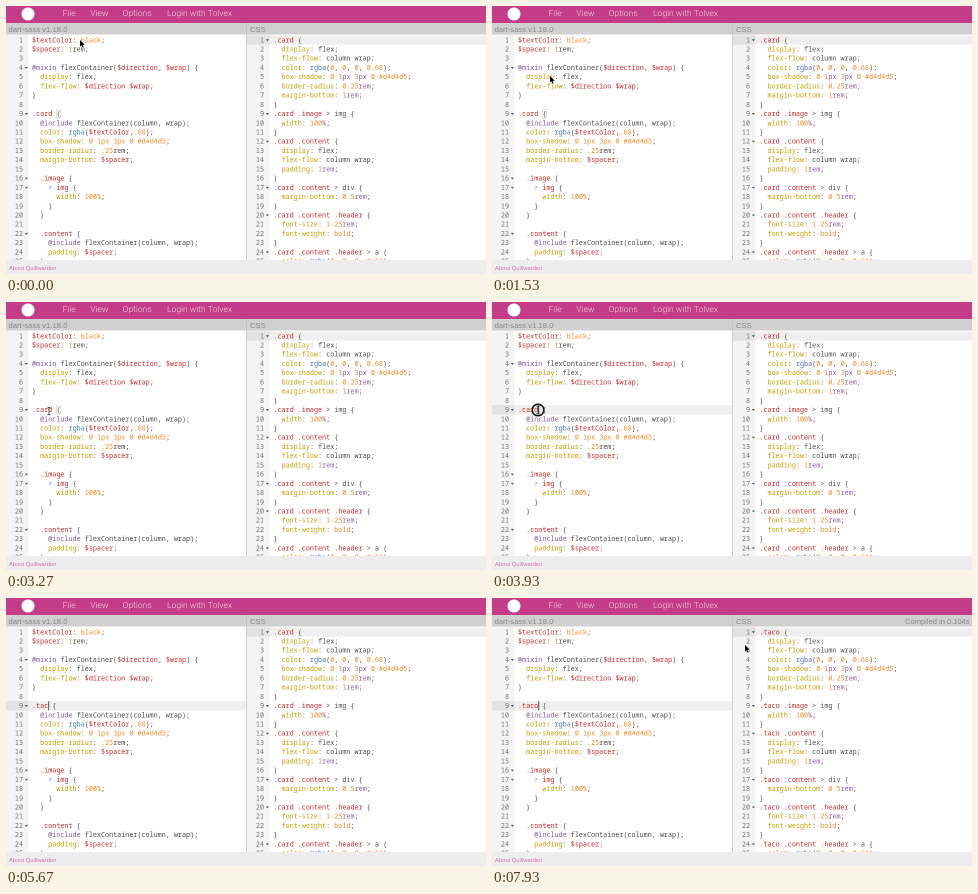
Animation of 480x268 px, one loop 8000 ms. Source, as an HTML page with a canvas:

```html
<!DOCTYPE html>
<html lang="en">
<head>
<meta charset="utf-8">
<title>Sass playground</title>
<style>
html, body { margin: 0; width: 100%; height: 100%; overflow: hidden; background: #fff; }
canvas { display: block; width: 480px; height: 268px; }
</style>
</head>
<body>
<canvas id="stage"></canvas>
<script>
const W = 480, H = 268, LOOP = 8000;
const LINE = 9.22, TOP = 29.4, CH = 4.06, LEFT_X = 26;
const MONO = '6.76px "Noto Sans Mono", "DejaVu Sans Mono", monospace';
const SANS = '"Liberation Sans", Arial, sans-serif';
const LIGHT = 'Roboto, "Liberation Sans", sans-serif';

const color = {
  text: '#4d4d4c', variable: '#c82829', keyword: '#8959a8', number: '#f5871f',
  prop: '#c99e00', func: '#4271ae', op: '#3e999f'
};

// Drawn at double size so that small text keeps its fractional positions
const canvas = document.getElementById('stage');
const scale = 2 * (window.devicePixelRatio || 1);
canvas.width = W * scale;
canvas.height = H * scale;
const ctx = canvas.getContext('2d');

const scss = name => `$textColor: black;
$spacer: 1rem;

@mixin flexContainer($direction, $wrap) {
  display: flex;
  flex-flow: $direction $wrap;
}

.${name} {
  @include flexContainer(column, wrap);
  color: rgba($textColor,.68);
  box-shadow: 0 1px 3px 0 #d4d4d5;
  border-radius: .25rem;
  margin-bottom: $spacer;

  .image {
    > img {
      width: 100%;
    }
  }

  .content {
    @include flexContainer(column, wrap);
    padding: $spacer;
  }`.split('\n');

const css = name => `.card {
  display: flex;
  flex-flow: column wrap;
  color: rgba(0, 0, 0, 0.68);
  box-shadow: 0 1px 3px 0 #d4d4d5;
  border-radius: 0.25rem;
  margin-bottom: 1rem;
}
.card .image > img {
  width: 100%;
}
.card .content {
  display: flex;
  flex-flow: column wrap;
  padding: 1rem;
}
.card .content > div {
  margin-bottom: 0.5rem;
}
.card .content .header {
  font-size: 1.25rem;
  font-weight: bold;
}
.card .content .header > a {
  color: rgba(0, 0, 0, 0.68);`.replaceAll('card', name).split('\n');

const TOKEN = /(\$\w+)|(@\w+)|(#[0-9a-f]{6}|\d*\.?\d+)(px|rem|%)?|([a-z-]+)(?=:)|(rgba)|(black|bold)|(\.[a-z]+)|(img)|(>)/g;

function tokens(line, isCss) {
  const out = [];
  let end = 0;
  const add = (text, fill, at) => { if (text) out.push({ text, fill, at }); };
  for (const m of line.matchAll(TOKEN)) {
    add(line.slice(end, m.index), color.text, end);
    end = m.index + m[0].length;
    const [all, variable, rule, num, unit, prop, func, constant, cls, tag] = m;
    if (num) {
      add(num, color.number, m.index);
      const unitFill = isCss ? color.keyword : unit === 'rem' ? color.text : color.number;
      add(unit, unitFill, m.index + num.length);
      continue;
    }
    const fill = variable || cls ? color.variable
      : rule ? color.keyword
      : prop ? color.prop
      : func ? color.func
      : constant ? color.number
      : isCss ? color.text
      : tag ? color.variable : color.op;
    add(all, fill, m.index);
  }
  add(line.slice(end), color.text, end);
  return out;
}

function rect(x, y, w, h, fill) {
  ctx.fillStyle = fill;
  ctx.fillRect(x, y, w, h);
}

function label(text, x, y, font, fill, align = 'left') {
  ctx.font = font;
  ctx.fillStyle = fill;
  ctx.textAlign = align;
  ctx.fillText(text, x, y);
}

function ring(x, y, r, width, stroke) {
  ctx.beginPath();
  ctx.arc(x, y, r, 0, Math.PI * 2);
  ctx.lineWidth = width;
  ctx.strokeStyle = stroke;
  ctx.stroke();
}

const rowTop = n => TOP + (n - 1) * LINE;
const col = n => LEFT_X + n * CH;

function gutter(x, lines, active) {
  rect(x, 28, 22.5, 226, '#f4f4f4');
  if (active) rect(x, rowTop(active), 22.5, LINE, '#e2e2e2');
  ctx.font = MONO;
  ctx.textAlign = 'right';
  lines.forEach((line, i) => {
    const y = rowTop(i + 1);
    ctx.fillStyle = '#6f6f6e';
    ctx.fillText(i + 1, x + 17, y + 6.9);
    if (!line.endsWith('{')) return;
    ctx.fillStyle = '#555';
    ctx.beginPath();
    ctx.moveTo(x + 18.8, y + 3.9);
    ctx.lineTo(x + 22, y + 3.9);
    ctx.lineTo(x + 20.4, y + 5.8);
    ctx.fill();
  });
}

function code(x, lines, isCss) {
  ctx.font = MONO;
  ctx.textAlign = 'left';
  lines.forEach((line, i) => {
    for (const t of tokens(line, isCss)) {
      ctx.fillStyle = t.fill;
      ctx.fillText(t.text, x + t.at * CH, rowTop(i + 1) + 6.9);
    }
  });
}

// Pointer path: time, x, y
const PATH = [
  [0, 74, 34], [930, 74, 34], [1530, 58, 70], [1730, 48, 79], [2130, 39.2, 109.6],
  [2800, 39.2, 109.6], [2930, 43, 109], [3530, 43, 109], [3670, 46, 108],
  [3930, 46, 108], [4530, 31, 109], [4950, 31, 109], [5070, 119, 122],
  [7400, 119, 122], [7930, 253, 47]
];

function pointerAt(t) {
  const i = PATH.findIndex(p => p[0] > t);
  if (i < 0) return PATH[PATH.length - 1].slice(1);
  const [t0, x0, y0] = PATH[i - 1], [t1, x1, y1] = PATH[i];
  const k = (t - t0) / (t1 - t0), e = k * k * (3 - 2 * k);
  return [x0 + (x1 - x0) * e, y0 + (y1 - y0) * e];
}

function arrow(x, y) {
  const pts = [[0, 0], [0, 6.6], [1.5, 5.3], [2.6, 7.8], [3.7, 7.3], [2.6, 4.9], [4.7, 4.8]];
  ctx.beginPath();
  pts.forEach(([dx, dy]) => ctx.lineTo(x + dx, y + dy));
  ctx.closePath();
  ctx.lineWidth = 0.8;
  ctx.strokeStyle = '#fff';
  ctx.stroke();
  ctx.fillStyle = '#000';
  ctx.fill();
}

function beam(x, y) {
  ctx.beginPath();
  ctx.moveTo(x - 1.5, y - 4);
  ctx.lineTo(x, y - 3.3);
  ctx.lineTo(x + 1.5, y - 4);
  ctx.moveTo(x, y - 3.3);
  ctx.lineTo(x, y + 3.3);
  ctx.moveTo(x - 1.5, y + 4);
  ctx.lineTo(x, y + 3.3);
  ctx.lineTo(x + 1.5, y + 4);
  ctx.lineWidth = 0.7;
  ctx.strokeStyle = '#222';
  ctx.stroke();
}

function pointer(t) {
  if (t >= 5330 && t < 7400) return;
  const [x, y] = pointerAt(t);
  if (t < 2800 || x > 235) arrow(x, y);
  else beam(x, y);
  if (t >= 2400 && t < 2470) ring(x, y, 8.2, 1.6, '#111');
  if (t >= 3870 && t < 4730) ring(x, y, 5.8, 1.5, '#111');
}

const KEYS = [5330, 5470, 5670, 5800];
const typed = t => KEYS.filter(k => t >= k).length;

function caretCol(t) {
  if (t >= KEYS[0]) return 1 + typed(t);
  return Math.max(1, Math.min(5, Math.round((pointerAt(Math.min(t, 4530))[0] - LEFT_X) / CH)));
}

function caretOn(t) {
  if (t < 3870) return false;
  const start = t >= KEYS[0] ? KEYS[typed(t) - 1] : t >= 4470 ? 4470 : t;
  return (t - start) % 1000 < 600;
}

function leftPane(t) {
  const name = t < KEYS[0] ? 'card' : 'taco'.slice(0, typed(t));
  const lines = scss(name), focused = t >= 3870, y = rowTop(9), c = caretCol(t);
  gutter(0, lines, focused ? 9 : 0);
  if (focused) rect(22.5, y, 218, LINE, '#efefef');
  if (focused && t < KEYS[0]) rect(col(c), y, (5 - c) * CH, LINE, '#d0d0d0');
  code(LEFT_X, lines, false);
  if (!focused) {
    ctx.lineWidth = 0.5;
    ctx.strokeStyle = '#cacaca';
    ctx.strokeRect(col(6), y + 0.3, CH, LINE - 0.6);
  }
  if (caretOn(t)) rect(col(c), y, 0.9, LINE, '#444');
}

function rightPane(t) {
  const lines = css(t < 7070 ? 'card' : 'taco');
  rect(240.5, 28, 239.5, 226, '#fff');
  gutter(241, lines, 1);
  rect(263.5, rowTop(1), 216.5, LINE, '#efefef');
  code(267.4, lines, true);
  rect(240, 17, 1, 237, '#cfcfcf');
}

function spinner(t) {
  ctx.save();
  ctx.translate(436.7, 23.5);
  ctx.rotate((t - 7000) / 1000 * Math.PI * 2);
  ring(0, 0, 3.6, 0.9, '#555');
  ctx.beginPath();
  ctx.moveTo(0, -2.2);
  ctx.lineTo(0, 0);
  ctx.lineTo(1.7, 0.9);
  ctx.stroke();
  ctx.restore();
}

function chrome(t) {
  const pink = '#c43b87', nav = '300 8.6px ' + LIGHT, navFill = '#f6dcea';
  rect(0, 0, W, 17, pink);
  ctx.fillStyle = '#fff';
  ctx.beginPath();
  ctx.arc(22, 8, 6.5, 0, Math.PI * 2);
  ctx.fill();
  label('File', 56.5, 9.9, nav, navFill);
  label('View', 84.3, 9.9, nav, navFill);
  label('Options', 116.5, 9.9, nav, navFill);
  label('Login with Tolvex', 161, 9.9, nav, navFill);

  const gray = '#888', status = '7.55px ' + SANS;
  rect(0, 17, W, 11.5, '#d0d0d0');
  rect(240, 17, 1, 11.5, '#c4c4c4');
  label('dart-sass v1.18.0', 2.5, 25.8, '7.7px ' + SANS, gray);
  label('CSS', 244, 25.8, '7.7px ' + SANS, gray);
  if (t >= 7070) label('Compiled in 0.104s', 477.7, 25.8, status, gray, 'right');
  else if (t >= 6600) {
    spinner(t);
    label('Compiling', 478, 25.8, status, gray, 'right');
  }

  rect(0, 254, W, 14, '#ededed');
  label('About Quillwarden', 3, 263.8, '5.8px ' + SANS, '#d373a8');
}

function draw(t) {
  ctx.setTransform(scale, 0, 0, scale, 0, 0);
  rect(0, 0, W, H, '#fff');
  leftPane(t);
  rightPane(t);
  chrome(t);
  pointer(t);
}

const start = performance.now();
function tick() {
  draw((performance.now() - start) % LOOP);
  requestAnimationFrame(tick);
}
tick();
</script>
</body>
</html>
```
